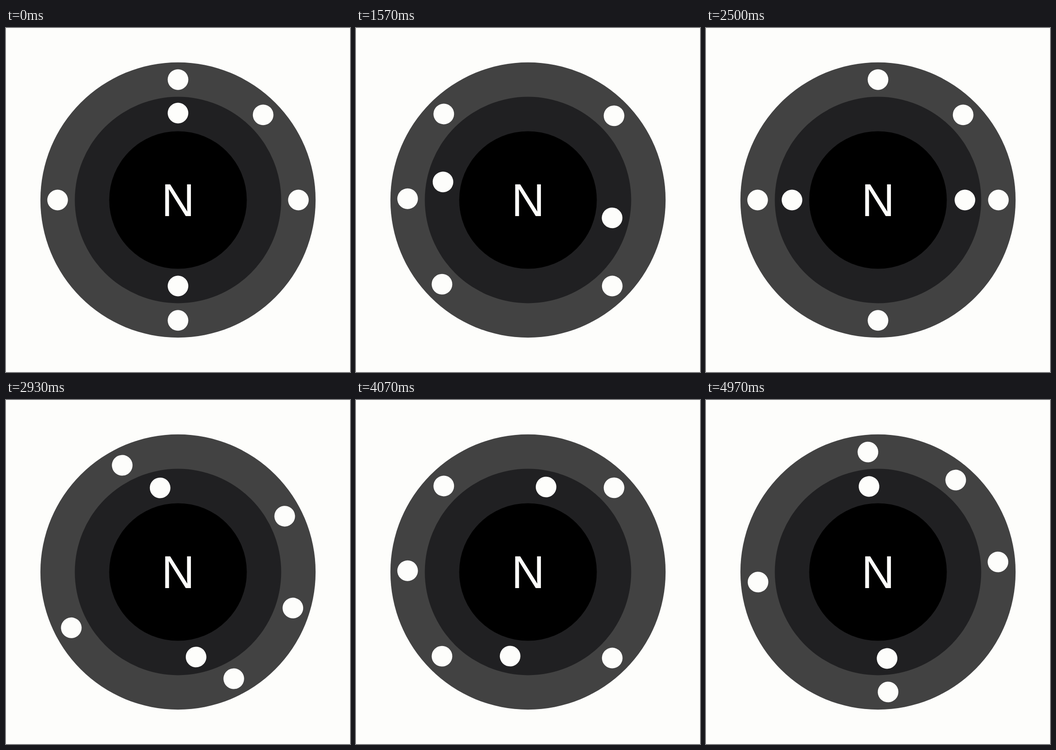
An HTML page that plays this animation: 748x748 px, repeating every 5.01 s.

```html
<!DOCTYPE html>
<html lang="en">
<head>
<meta charset="utf-8">
<title>Nitrogen atom</title>
<style>
  html, body { margin: 0; width: 100%; height: 100%; overflow: hidden; background: #fdfdfb; }
  svg { display: block; width: 100vw; height: 100vh; }
  .electron, text { fill: #fdfdfb; }
  text { font: 100px "Liberation Sans", Arial, sans-serif; text-anchor: middle; }
</style>
</head>
<body>
<svg viewBox="-374 -374 748 748">
  <circle r="299.2" fill="#424242"/>
  <circle r="224.4" fill="#202022"/>
  <circle r="149.6"/>
  <text y="35">N</text>
  <g id="outer"></g>
  <g id="inner"></g>
</svg>
<script>
const LOOP = 5010, STEPS = 150;
const outer = document.getElementById('outer');
const inner = document.getElementById('inner');

// Angles are in degrees, clockwise from the top.
function addElectron(shell, orbit, angle) {
  const dot = document.createElementNS('http://www.w3.org/2000/svg', 'circle');
  dot.setAttribute('class', 'electron');
  dot.setAttribute('r', 22.44);
  dot.setAttribute('cy', -orbit);
  dot.setAttribute('transform', `rotate(${angle})`);
  shell.append(dot);
}

function turn(shell, angle) {
  shell.setAttribute('transform', `rotate(${angle})`);
}

for (const angle of [0, 45, 90, 180, 270]) addElectron(outer, 261.8, angle);
addElectron(inner, 189, 0);
addElectron(inner, 187, 180);

function draw() {
  // 30 steps per second, each starting on a 10 ms tick
  const tick = Math.floor(performance.now() % LOOP / 10);
  const step = Math.min(STEPS - 1, Math.floor(tick * 0.3 + 0.11));
  turn(outer, step * 4.8);
  turn(inner, step * 6);
  requestAnimationFrame(draw);
}
draw();
</script>
</body>
</html>
```
